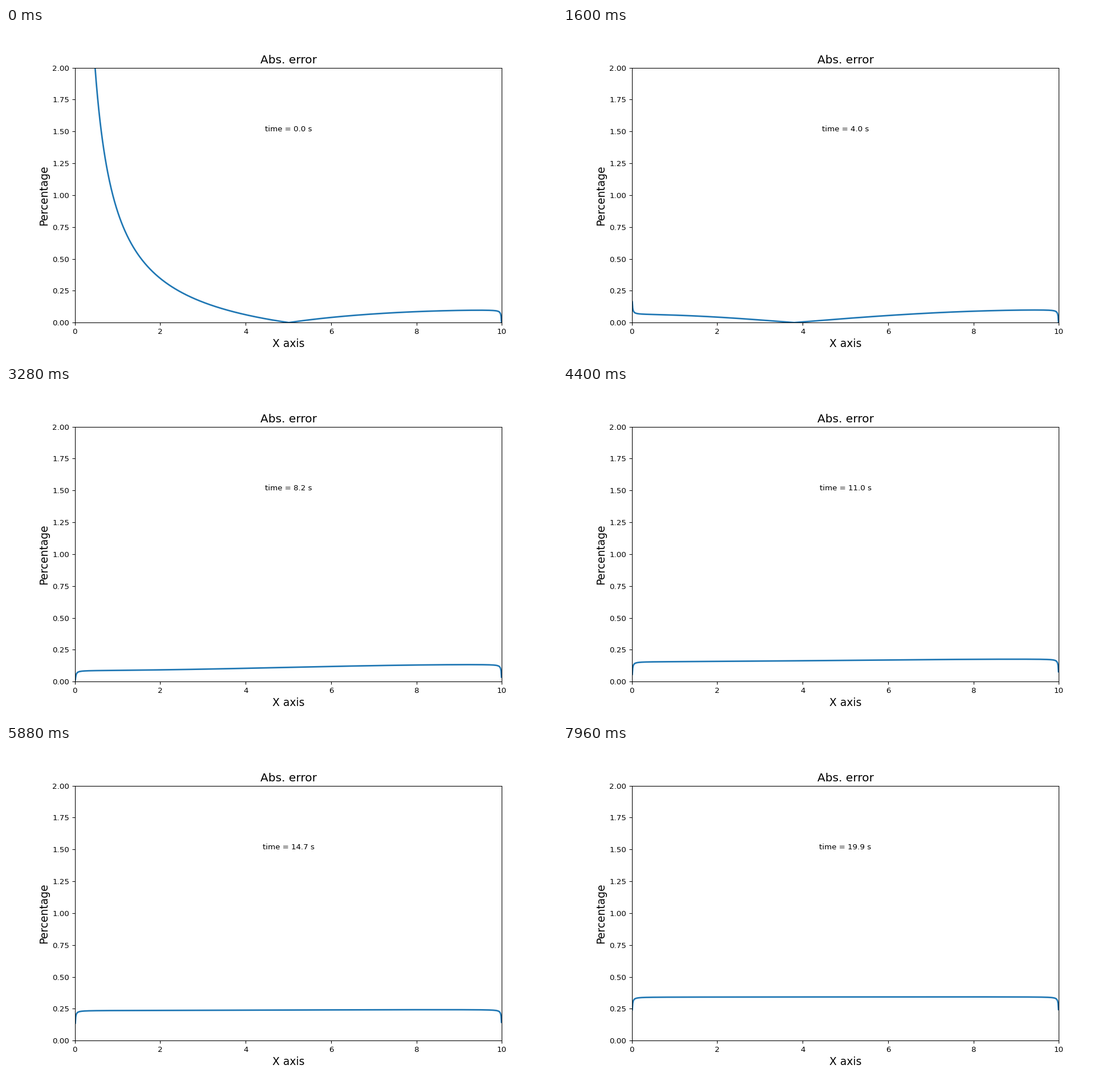
A matplotlib script for the animation above (8000 ms loop, 966 by 580 pixels).

```python
import numpy as np
import matplotlib.pyplot as plt
from matplotlib.animation import FuncAnimation

WIDTH, HEIGHT, DPI = 966, 580, 96.6
FRAMES, INTERVAL, DT = 200, 40, 0.1
LENGTH, STEP = 10.0, 0.01
KAPPA = (np.pi / LENGTH) ** 2      # decay rate of the first heat mode

x = np.arange(1, 1000) * STEP
theta = np.pi * x / LENGTH
edge = 0.001 / x + 0.001 / (LENGTH - x)

# Sine series of the initial deviation -0.1 (pi - theta) cos(theta)
n = np.arange(1, 81)
coef = np.full(n.size, -0.05)
coef[1:] = -0.2 * n[1:] / (n[1:] ** 2 - 1)
ratio = np.sin(np.outer(theta, n)) / np.sin(theta)[:, None]


def error(t):
    """Absolute relative error in percent at time t."""
    if t == 0:
        dev = -0.1 * (np.pi - theta) / np.tan(theta)
    else:
        dev = ratio @ (coef * np.exp(-KAPPA * (n ** 2 - 1) * t))
    return np.abs(dev + 0.2 * KAPPA * t - edge)


fig, ax = plt.subplots(figsize=(WIDTH / DPI, HEIGHT / DPI + 1e-9), dpi=DPI)
ax.set_xlim(0, LENGTH)
ax.set_ylim(0, 2)
ax.set_title("Abs. error", fontsize=15)
ax.set_xlabel("X axis", fontsize=14)
ax.set_ylabel("Percentage", fontsize=14)
line, = ax.plot(x, error(0), color="#1f77b4", lw=2)
clock = ax.text(5, 1.5, "", ha="center", fontsize=10)


def update(i):
    t = i * DT
    line.set_ydata(error(t))
    clock.set_text(f"time = {t:.1f} s")
    return line, clock


anim = FuncAnimation(fig, update, frames=FRAMES, interval=INTERVAL,
                     init_func=lambda: update(0), repeat=True, repeat_delay=0)
plt.show()
```
